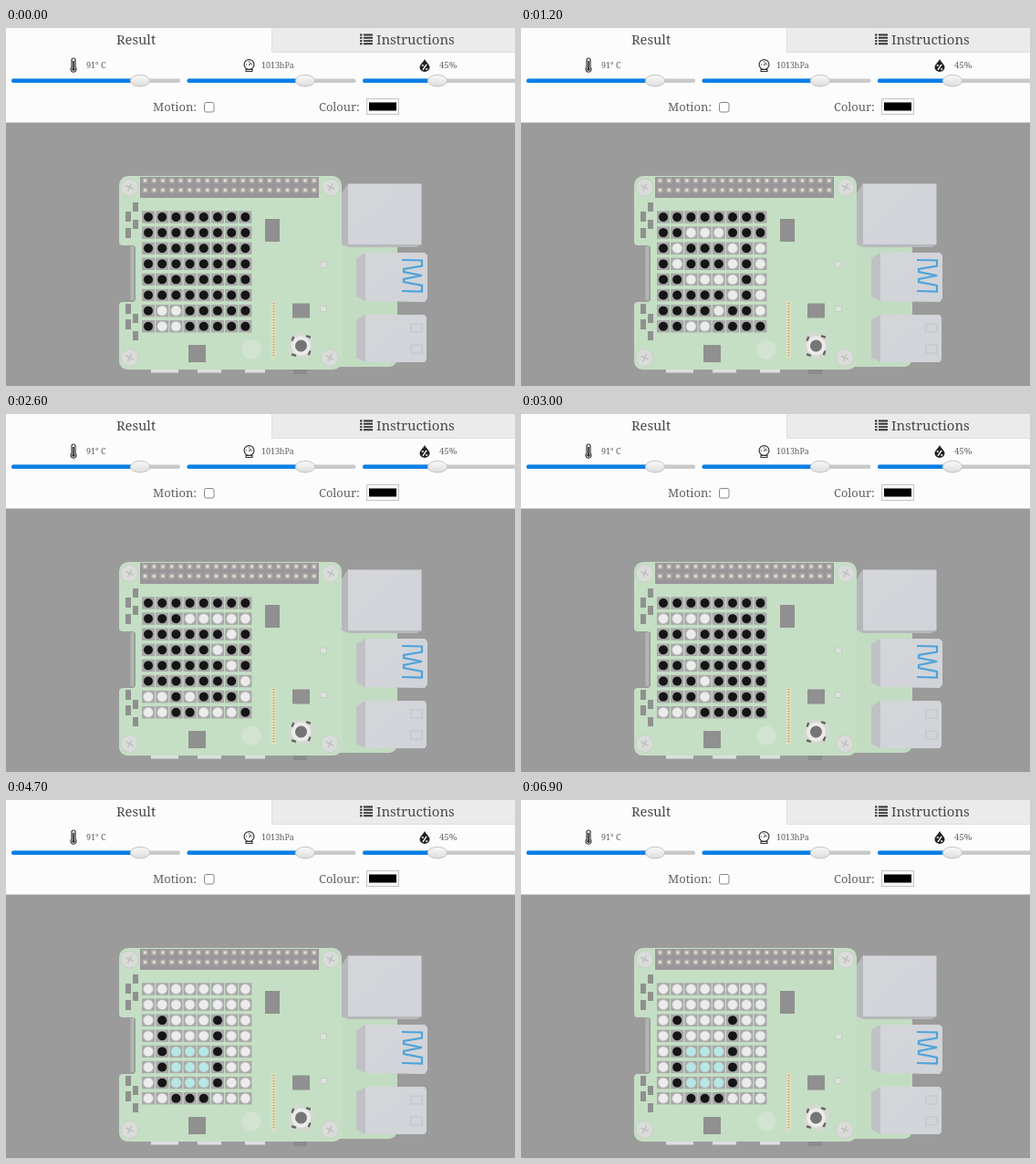
Animation of 558x392 px, one loop 7.1 s. Source, as an HTML page:

```html
<!DOCTYPE html>
<html lang="en">
<head>
<meta charset="utf-8">
<title>LED board</title>
<style>
html, body { margin: 0; width: 100%; height: 100%; overflow: hidden; background: #9b9b9b; }
svg { display: block; width: 558px; height: 392px; }
text { font-family: "Noto Serif", serif; font-weight: 300; fill: #606060; }
.title { fill: #484848; }
</style>
</head>
<body>
<svg id="stage" viewBox="0 0 558 392" xmlns="http://www.w3.org/2000/svg">
  <defs>
    <linearGradient id="knob" x2="0" y2="1">
      <stop stop-color="#fafafa"/><stop offset="1" stop-color="#dcdcdc"/>
    </linearGradient>
    <linearGradient id="metal" x2="1" y2="1">
      <stop stop-color="#d4d6da"/><stop offset="1" stop-color="#d0d3d8"/>
    </linearGradient>
  </defs>
  <rect width="558" height="392" fill="#9b9b9b"/>
  <rect width="558" height="103.5" fill="#fcfcfc"/>
  <path d="M291 0H558V26H291Z" fill="#ebebeb"/>
  <path d="M291.5 0V26.5H558" fill="none" stroke="#dedede"/>
  <text class="title" x="142.5" y="17.5" font-size="14.7" text-anchor="middle">Result</text>
  <text class="title" x="406" y="17.5" font-size="14.9">Instructions</text>
  <path d="M388 7.500h2.500m1.500 0h10M388 10.800h2.500m1.500 0h10M388 14.100h2.500m1.500 0h10M388 17.200h2.500m1.500 0h10" stroke="#333" stroke-width="1.9"/>

  <g fill="none" stroke="#333">
    <path d="M72 43V35a2 2 0 0 1 4 0V43a3 3 0 1 1-4 0Z" stroke-width="1.2"/>
    <path d="M74 36V45" stroke-width="1.7"/>
    <circle cx="74" cy="45.3" r="1.7" fill="#333" stroke="none"/>
    <circle cx="266.5" cy="40" r="5.4" stroke-width="1.2"/>
    <path d="M263 40h1m5 0h1m-3.500-3.500v1M266.500 41l2-3M263 45.500h7v2h-7z" stroke-width="1.1"/>
    <path d="M459 34C457 38 453.500 40 453.500 43a5.500 5 0 0 0 11 0C464.500 40 461 38 459 34Z" fill="#222" stroke="none"/>
    <path d="M457 45.800l4-6M455.800 41h2m2.400 4h2" stroke="#fff" stroke-width="1.400"/>
  </g>
  <text x="88" y="44" font-size="9">91° C</text>
  <text x="280" y="44" font-size="8.9">1013hPa</text>
  <text x="475" y="44" font-size="9.6">45%</text>
  <g id="sliders"></g>
  <text x="161" y="90.500" font-size="13">Motion:</text>
  <rect x="217.500" y="81.500" width="10.500" height="10.500" rx="2" fill="#fff" stroke="#868686"/>
  <text x="343" y="90.500" font-size="12.9">Colour:</text>
  <rect x="395.500" y="77.500" width="35" height="17" fill="#f8f8f8" stroke="#c4c4c4"/>
  <rect x="398" y="81.500" width="30" height="9" fill="#000"/>

  <g fill="#dedede">
    <path d="M159 373h30v4.500h-30zM210 373h26v4.500h-26zM262 373h22v4.500h-22z"/>
    <path d="M315 373h15v6h-15z" fill="#8c8c8c"/>
  </g>
  <path d="M360 200H421a8 8 0 0 1 8 8V362a9 9 0 0 1-9 9H360Z" fill="#c2dcc2"/>
  <path d="M134 162H358a10 10 0 0 1 10 10V365a9 9 0 0 1-9 9H133a9 9 0 0 1-9-9V304a4 4 0 0 1 4-4H138a4 4 0 0 0 4-4V242a4 4 0 0 0-4-4H128a4 4 0 0 1-4-4V172a10 10 0 0 1 10-10Z" fill="#c5dfc5"/>
  <path d="M136.500 239h5v59h-5z" fill="#b2b6b3"/>
  <path d="M141 239v59" stroke="#8d908e"/>
  <g id="pins"><path d="M147 163h196v23H147z" fill="#989698"/></g>
  <g id="chips" fill="#8f908f"></g>
  <g id="screws"></g>
  <g fill="#dce2dc" stroke="#bdc9bd" stroke-width=".8">
    <path d="M344.500 256h7v6h-7zM344.500 304.500h7v6h-7z"/>
  </g>
  <path d="M291 299.500h5v62h-5z" fill="#e5dfbd"/>
  <path d="M293.500 301v60" stroke="#b5ad8c" stroke-width="2.400" stroke-dasharray="1.300 1.700"/>
  <circle cx="269" cy="352" r="10.500" fill="#d3e3d2"/>
  <g transform="translate(323.500 348) rotate(18)">
    <rect x="-13" y="-13" width="26" height="26" rx="7" fill="#d3d9d1"/>
    <path d="M-11-7v5M11 2v5M2-12h5M-7 12h5" stroke="#666" stroke-width="2.400"/>
    <circle r="10.500" fill="#ebebe9"/>
    <circle r="6.500" fill="#747574"/>
  </g>

  <path d="M375 170L368 181V237L376 240H450L456 237Z" fill="#b6b8bb"/>
  <path d="M375 170.500h80.500v66.500H375z" fill="url(#metal)"/>
  <path d="M394 246L384 252V294L394 299Z" fill="#bfc1c4"/>
  <path d="M394 246H459l3 3V296l-3 4L394 299Z" fill="url(#metal)"/>
  <path d="M434 254L456 254.500V260.500L436 264V267L456 271L436 275V278L456 282V288.500L434 288" fill="none" stroke="#4fa3da" stroke-width="2.200"/>
  <path d="M394 314L384 320V361L394 366Z" fill="#bfc1c4"/>
  <path d="M394 314H459l2 3V363l-2 3H394Z" fill="url(#metal)"/>
  <path d="M444 324h12v9h-12zM444 347h12v9h-12z" fill="none" stroke="#c2c4c8" stroke-width="1.200"/>
  <g id="matrix"></g>
</svg>
<script>
const LOOP = 7100, STEP = 107.7;
const BLACK = '#151515', WHITE = '#ececec', WATER = '#b5e8e6';
const CUP_AT = 3450, DRINK_AT = 4450;

const glyphs = {
  '9': '.###. #...# #...# .#### ....# ...#. .##..',
  '0': '.###. #...# #..## #.#.# ##..# #...# .###.',
  '.': '.. .. .. .. .. ## ##',
  '3': '##### ...#. ..#.. ...#. ....# #...# .###.'
};

function add(parent, tag, attrs) {
  const node = document.createElementNS('http://www.w3.org/2000/svg', tag);
  for (const key in attrs) node.setAttribute(key, attrs[key]);
  return document.getElementById(parent).appendChild(node);
}
const box = (parent, x, y, width, height, fill, rx = 0) =>
  add(parent, 'rect', { x, y, width, height, rx, ...(fill && { fill }) });

for (const [left, knob] of [[6, 147], [198.5, 328], [391, 473]]) {
  box('sliders', left, 55.5, 185, 4.5, '#c9c9c9', 2);
  box('sliders', left, 55.5, knob - left, 4.5, '#087fe8', 2);
  add('sliders', 'ellipse', { cx: knob, cy: 57.7, rx: 10.7, ry: 6.3, fill: 'url(#knob)', stroke: '#c4c4c4' });
}

for (let i = 0; i < 20; i++) {
  for (const y of [167, 177.5]) {
    const x = 152.5 + i * 9.75;
    box('pins', x - 3.4, y - 3.3, 6.8, 6.6, '#a8a6a5', 1);
    box('pins', x - 1.6, y - 1.6, 3.2, 3.2, '#e0dcc8');
  }
}

for (const rect of [[284, 209, 16, 25], [314, 301.5, 19, 16], [200, 347, 19, 19]]) box('chips', ...rect);
for (const y of [191, 210, 313, 332]) box('chips', 139, y, 6, 10);
for (const y of [201, 219, 302, 319]) box('chips', 131, y, 6, 11);

for (const [cx, cy] of [[135.5, 174.5], [356, 174.5], [135.5, 361], [355, 361]]) {
  add('screws', 'circle', { cx, cy, r: 9.5, fill: '#d9dcd9', stroke: '#c6d0c6' });
  add('screws', 'path', { d: `M${cx - 4} ${cy - 2}l8 4m-2-6l-4 8`, stroke: '#bec1be', 'stroke-width': 1.6 });
}

const leds = Array.from({ length: 64 }, (_, i) => {
  const cx = 156 + (i % 8) * 15.2, cy = 207 + (i >> 3) * 17.1;
  box('matrix', cx - 7, cy - 6.7, 14, 13.4, '#a8a9a8');
  return add('matrix', 'circle', { cx, cy, r: 5.4, stroke: '#c6c6c6', 'stroke-width': .6 });
});

// Column where each character starts, measured from the reading's first column.
const reading = [];
let width = 0;
for (const char of '90.3') {
  const rows = glyphs[char].split(' ');
  reading.push({ rows, start: width });
  width += rows[0].length + 1;
}
const closingDot = { rows: glyphs['.'].split(' '), start: -11 };
const message = [closingDot, ...reading];

function scrollColor(col, row, shift) {
  const lit = message.some(({ rows, start }) =>
    row > 0 && rows[row - 1][col + shift - start] === '#');
  return lit ? WHITE : BLACK;
}

function cupColor(col, row, surface) {
  const inside = col > 1 && col < 5;
  const wall = row > 1 && row < 7 && (col === 1 || col === 5);
  if (wall || (row === 7 && inside)) return BLACK;
  return inside && row >= surface && row < 7 ? WATER : WHITE;
}

function render(t) {
  const shift = Math.floor((t - 1200) / STEP + .75) - 1;
  const surface = t < DRINK_AT ? 2 : 4;
  leds.forEach((led, i) => {
    const col = i % 8, row = i >> 3;
    led.setAttribute('fill', t < CUP_AT ? scrollColor(col, row, shift) : cupColor(col, row, surface));
  });
}

const begin = performance.now();
function tick() {
  render((performance.now() - begin) % LOOP);
  requestAnimationFrame(tick);
}
tick();
</script>
</body>
</html>
```
